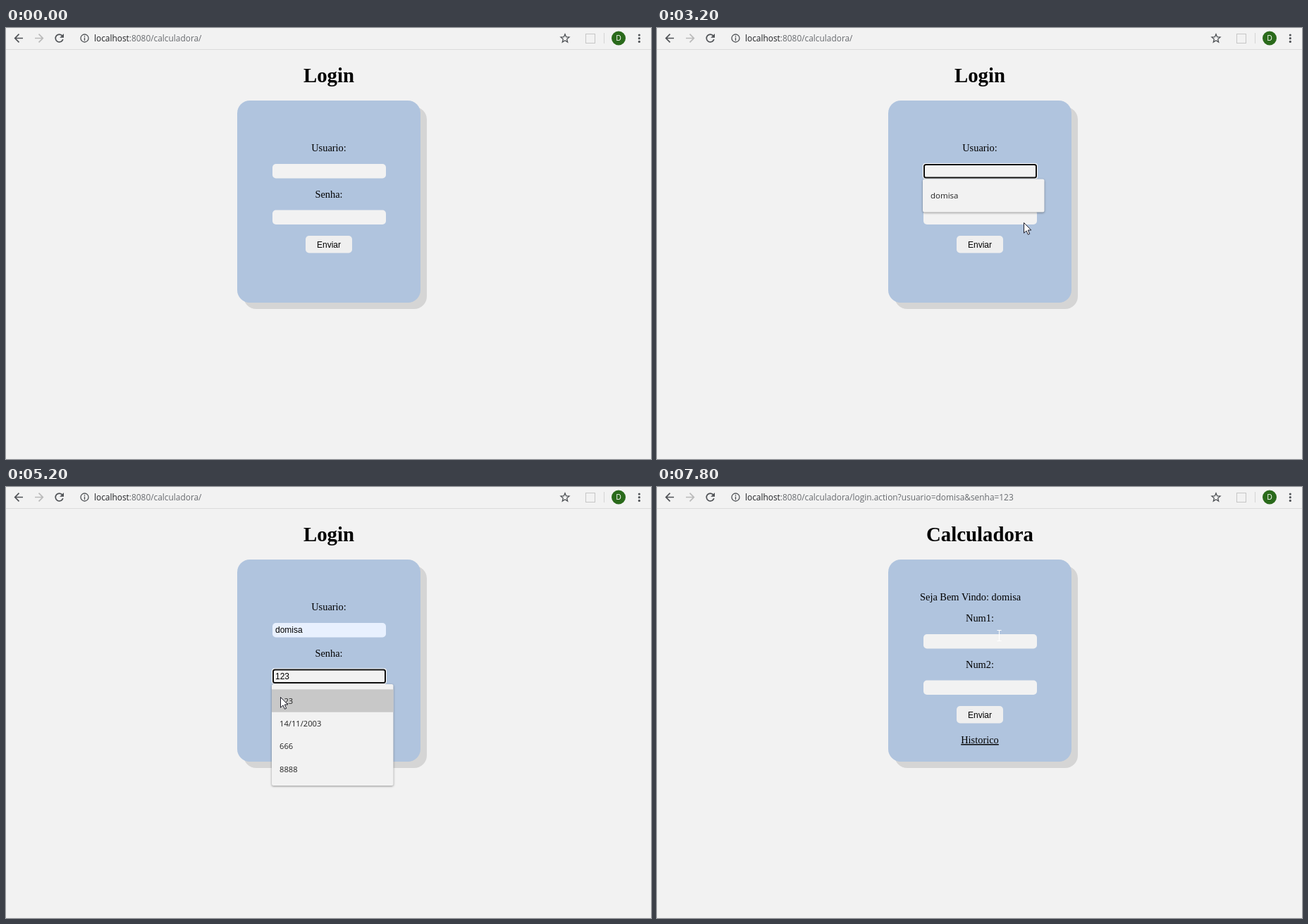
An HTML page that plays this animation: 915 px wide and 612 px high, repeating every 8000 ms.

```html
<!DOCTYPE html>
<html lang="pt">
<head>
<meta charset="utf-8">
<title>Login</title>
<style>
  html, body { margin: 0; width: 100%; height: 100%; overflow: hidden; background: #f2f2f2; }
  svg { display: block; width: 915px; height: 612px; font: 14.4px "Liberation Serif", serif; }
  .title { font-size: 28.8px; font-weight: bold; }
  .mid { text-anchor: middle; }
  .field { font: 12px "Liberation Sans", sans-serif; }
  .ui { font: 11.9px "Open Sans", sans-serif; }
  .line { fill: none; stroke: #505357; stroke-width: 1.7; }
  .menu { fill: #f2f2f2; filter: drop-shadow(0 1px 1.5px #0006); }
</style>
</head>
<body>
<svg id="stage" viewBox="0 0 915 612"></svg>
<script>
const USER = 'domisa', PASSWORDS = ['123', '14/11/2003', '666', '8888'];
const LOOP = 8000;

// Each entry changes part of the state from its time (ms) on.
// cursor: [x, y, isTextBeam]; caret: x position, 0 when hidden
const timeline = [
  [0, { page: 'login', focus: -1, user: '', pass: '', caret: 0, menu: '', hover: false, cursor: null, loading: false, typo: false }],
  [400, { cursor: [470, 66] }],
  [600, { cursor: [463, 110] }],
  [800, { cursor: [452, 155] }],
  [1000, { cursor: [443.5, 192.5, true] }],
  [1200, { focus: 0, caret: 382.5 }],
  [1400, { menu: 'user' }],
  [1800, { caret: 0 }],
  [2400, { cursor: [474, 248], hover: true, user: USER, caret: 382.5 }],
  [2600, { cursor: [510, 272], hover: false, user: '' }],
  [2800, { cursor: [548, 296] }],
  [3000, { cursor: [563, 301], caret: 0 }],
  [3200, { cursor: [520, 276] }],
  [3400, { cursor: [476, 250], hover: true, user: USER }],
  [3600, { cursor: [465, 253], hover: false, menu: '', caret: 421.5, typo: true }],
  [3800, { cursor: [455.5, 261.5, true] }],
  [4200, { focus: 1, caret: 382.5, typo: false }],
  [4400, { menu: 'pass' }],
  [4800, { cursor: [436, 283], caret: 0 }],
  [5000, { cursor: [410, 294], hover: true, pass: '123' }],
  [5200, { cursor: [389, 298] }],
  [5400, { menu: '', hover: false, caret: 403.5 }],
  [5800, { cursor: [408, 299], caret: 0 }],
  [6000, { cursor: [436, 298] }],
  [6200, { cursor: [456, 297] }],
  [6600, { focus: -1, loading: true }],
  [6800, { page: 'calc', loading: false, user: '', pass: '' }],
  [7000, { cursor: [456, 311] }],
  [7400, { cursor: [446, 272] }],
  [7600, { cursor: [462, 236] }],
  [7800, { cursor: [485.5, 203.5, true] }],
];

const text = (x, y, str, cls = '', extra = '') =>
  `<text x="${x}" y="${y}" class="${cls}" ${extra}>${str}</text>`;
const rect = (x, y, w, h, r, fill, extra = '') =>
  `<rect x="${x}" y="${y}" width="${w}" height="${h}" rx="${r}" fill="${fill}" ${extra}/>`;
const line = (d, extra = '') => `<path class="line" d="${d}" ${extra}/>`;
const circle = (x, y, r, fill) => `<circle cx="${x}" cy="${y}" r="${r}" fill="${fill}"/>`;

function toolbar({ page, loading }) {
  const query = page === 'calc' ? `login.action?usuario=${USER}&amp;senha=123` : '';
  const star = Array.from({ length: 10 }, (_, i) => {
    const r = i % 2 ? 2.8 : 6.3, a = i * Math.PI / 5;
    return `${793 + r * Math.sin(a)},${15 - r * Math.cos(a)}`;
  }).join(' ');
  return rect(0, 30, 915, 1, 0, '#dcdcdc')
    + line('M24 14.5H13M18.5 8.7L12.7 14.5L18.5 20.3')
    + line('M41 14.5H52M46.5 8.7L52.3 14.5L46.5 20.3', 'style="stroke:#bababa"')
    + (loading
      ? line('M70.5 9.5L80.5 19.5M80.5 9.5L70.5 19.5')
      : line('M80 11.3A5.4 5.4 0 1 0 80.8 16') + '<path d="M82 8V13.8H76.2Z" fill="#505357"/>')
    + line('M117 14.5A5.5 5.5 0 1 0 106 14.5A5.5 5.5 0 1 0 117 14.5M111.5 13.5V18M111.5 11V12.4', 'style="stroke-width:1.3"')
    + text(125, 19, `<tspan fill="#202124">localhost</tspan>:8080/calculadora/${query}`, 'ui', 'fill="#686b6f"')
    + `<polygon class="line" style="stroke-width:1.3" points="${star}"/>`
    + rect(822.5, 8.5, 13, 13, 0, 'none', 'stroke="#c6c6c6"')
    + rect(848, 7, 1, 15, 0, '#d4d4d4')
    + circle(869, 14.5, 10, '#2a6a1b')
    + text(869, 18.3, 'D', 'ui mid', 'fill="#fff" style="font-size:10.5px"')
    + [10, 14.7, 19.4].map(y => circle(898.3, y, 1.6, '#505357')).join('');
}

function input(y, value, focused, fill, caret) {
  return (focused ? rect(377, y - 1, 163, 22.5, 4, '#fff') : '')
    + rect(378, y, 161, 20.5, focused ? 3.5 : 5, focused ? '#101010' : fill)
    + (focused ? rect(380, y + 2, 157, 16.5, 1.5, fill) : '')
    + text(382, y + 14.2, value, 'field')
    + (focused && caret ? rect(caret - .5, y + 3, 1, 14, 0, '#000') : '');
}

function form(y, labels, { focus, user, pass, caret }) {
  return text(458, y, labels[0], 'mid')
    + input(y + 18, user, focus === 0, user ? '#e8f0fe' : '#f2f2f2', caret)
    + text(458, y + 66, labels[1], 'mid')
    + input(y + 83.5, pass, focus === 1, '#f2f2f2', caret)
    + rect(425, y + 120, 66, 24.5, 5, '#efefef')
    + text(458, y + 136.5, 'Enviar', 'field mid');
}

function menu({ menu, hover }) {
  if (!menu) return '';
  const isUser = menu === 'user';
  const items = isUser ? [USER] : PASSWORDS;
  const top = isUser ? 214.5 : 280;
  const size = isUser ? 11.5 : 11.2;
  return rect(377, top, 172.5, 14.7 + items.length * 32.3, 2.5, '#f2f2f2', 'class="menu"')
    + (hover ? rect(377, top + 7.4, 172.5, 32.3, 0, '#c8c8c8') : '')
    + items.map((item, i) =>
      text(388, top + 27.8 + i * 32.3, item, 'ui', `fill="#222" style="font-size:${size}px"`)).join('');
}

function pointer({ cursor }) {
  if (!cursor) return '';
  const [x, y, beam] = cursor;
  const shape = beam
    ? '<path d="M-3 0H3M0 0V15M-3 15H3" fill="none" stroke="#fff"/>'
    : '<path d="M.5 .5V15.2L4 11.9L6.4 17.3L8.7 16.3L6.3 11H10.8Z" fill="#fff" stroke="#1c1c28"/>';
  return `<g transform="translate(${x} ${y})">${shape}</g>`;
}

function draw(state) {
  const login = state.page === 'login';
  let squiggle = 'M382 209.5';
  for (let i = 0; i < 19; i++) squiggle += `l2 ${i % 2 ? -1.5 : 1.5}`;
  return toolbar(state)
    + text(458, 77, login ? 'Login' : 'Calculadora', 'title mid')
    + rect(337, 112, 260, 287, 18, '#d5d5d5')
    + rect(328, 103, 260, 287, 18, '#b0c4de')
    + (login
      ? form(175, ['Usuario:', 'Senha:'], state)
      : text(373, 160.5, `Seja Bem Vindo: ${USER}`)
        + form(191, ['Num1:', 'Num2:'], state)
        + text(458, 364, 'Historico', 'mid', 'text-decoration="underline"'))
    + (state.typo ? `<path d="${squiggle}" fill="none" stroke="#e33" stroke-width=".9"/>` : '')
    + menu(state)
    + pointer(state);
}

const stage = document.getElementById('stage');
let shown = 0;
function tick() {
  const t = performance.now() % LOOP;
  const count = timeline.filter(([start]) => start <= t).length;
  if (count !== shown) {
    shown = count;
    stage.innerHTML = draw(Object.assign({}, ...timeline.slice(0, count).map(entry => entry[1])));
  }
  requestAnimationFrame(tick);
}
tick();
</script>
</body>
</html>
```
